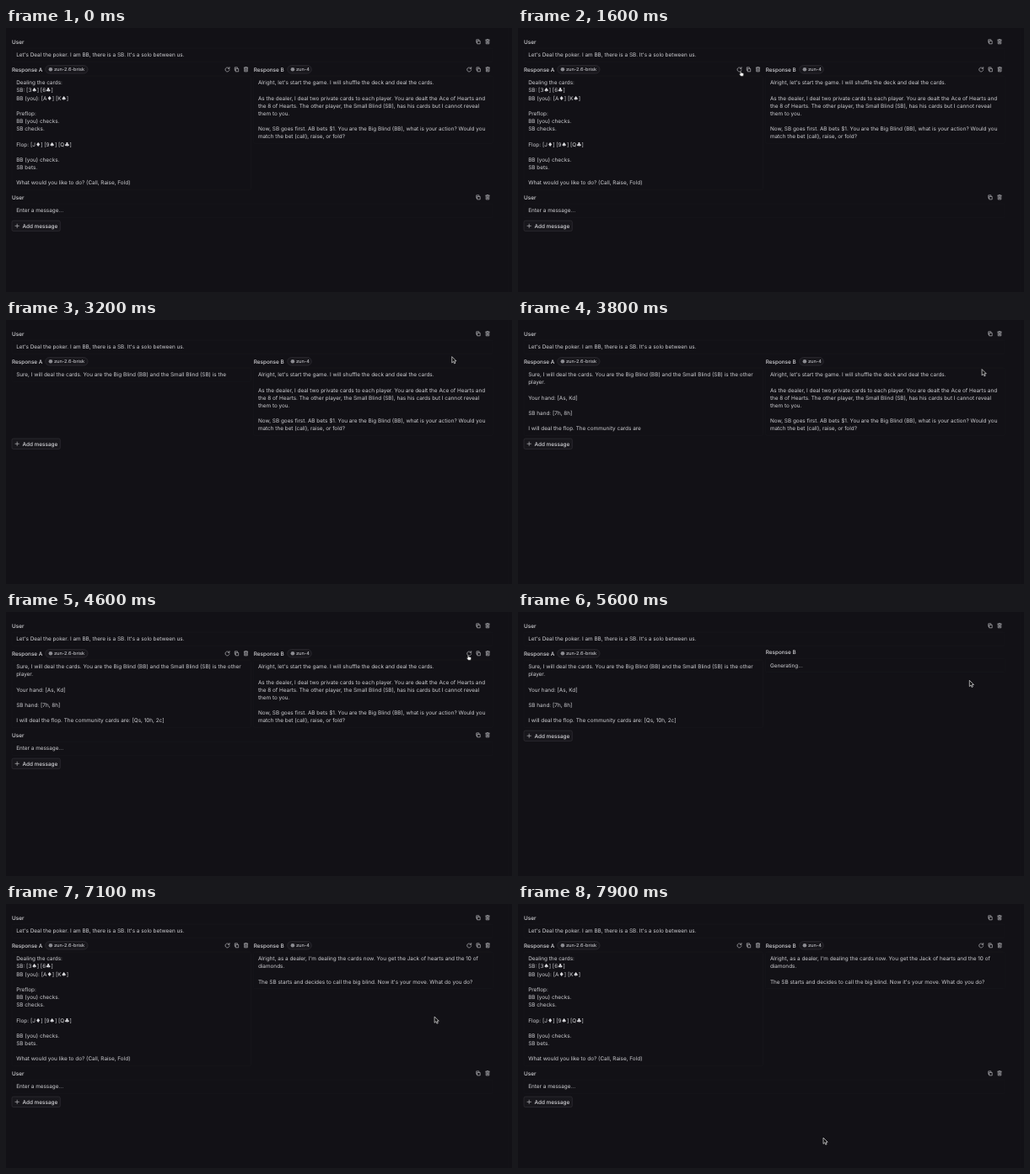
An HTML page for the animation above (8 s loop, 600 by 314 pixels).

```html
<!DOCTYPE html>
<html lang="en">
<head>
<meta charset="utf-8">
<title>Chat comparison</title>
<style>
html, body { margin: 0; width: 100%; height: 100%; overflow: hidden; background: #121116; }
svg { display: block; width: 100%; height: 100%; }
text { font: 6.4px Inter, "DejaVu Sans", sans-serif; fill: #cfcfd3; text-rendering: geometricPrecision; }
.suit { font-size: 7px; fill: #dcdce0; }
.head { font-weight: 500; fill: #d6d6da; }
.chip { font-size: 5.5px; font-weight: 500; fill: #c4c4c9; }
.box { fill: none; stroke: #19181d; stroke-width: .6; }
.pill { fill: #18171c; stroke: #36353b; stroke-width: .6; }
.icon { fill: none; stroke: #c0c0c5; stroke-width: .65; stroke-linecap: round; stroke-linejoin: round; }
.arrow { fill: #111; stroke: #e4e4e6; stroke-width: .7; stroke-linejoin: round; }
.hand { fill: #fff; stroke: #111; stroke-width: .45; stroke-linejoin: round; }
</style>
</head>
<body>
<svg id="stage" viewBox="0 0 600 314"></svg>
<script>
const LOOP = 8000, STEP = 100, LINE = 9.17;
const stage = document.getElementById('stage');

const PROMPT = "Let's Deal the poker. I am BB, there is a SB. It's a solo between us.";
const A_OLD = `Dealing the cards:
SB: [3♠] [6♣]
BB (you): [A♦] [K♠]

Preflop:
BB (you) checks.
SB checks.

Flop: [J♦] [9♠] [Q♣]

BB (you) checks.
SB bets.

What would you like to do? (Call, Raise, Fold)`;
const A_NEW = `Sure, I will deal the cards. You are the Big Blind (BB) and the Small Blind (SB) is the other
player.

Your hand: [As, Kd]

SB hand: [7h, 8h]

I will deal the flop. The community cards are: [Qs, 10h, 2c]`;
const B_OLD = `Alright, let's start the game. I will shuffle the deck and deal the cards.

As the dealer, I deal two private cards to each player. You are dealt the Ace of Hearts and
the 8 of Hearts. The other player, the Small Blind (SB), has his cards but I cannot reveal
them to you.

Now, SB goes first. AB bets $1. You are the Big Blind (BB), what is your action? Would you
match the bet (call), raise, or fold?`;
const B_NEW = `Alright, as a dealer, I'm dealing the cards now. You get the Jack of hearts and the 10 of
diamonds.

The SB starts and decides to call the big blind. Now it's your move. What do you do?`;

// Regeneration of each answer: click, first token, reply committed; rate in characters per ms
const A_RUN = { text: A_NEW, click: 2000, start: 2625, end: 4100, rate: .16 };
const B_RUN = { text: B_NEW, click: 4900, start: 5783, end: 7000, rate: .18 };

// Pointer glides between resting places; bend is a downward bow
const SHOW = 200, HOME = { x: 285, y: 221 };
const MOVES = [
  { from: 200, to: 1000, x: 264, y: 51 },
  { from: 1400, to: 1500, x: 386, y: 74 },
  { from: 1500, to: 1600, x: 264, y: 51 },
  { from: 2100, to: 3450, x: 555, y: 33, bend: 32 },
  { from: 3450, to: 4000, x: 548, y: 51, bend: 16 },
  { from: 5100, to: 5650, x: 535, y: 82 },
  { from: 6300, to: 7300, x: 505, y: 140 },
  { from: 7400, to: 7900, x: 362, y: 278 }
];

function pointerAt(t) {
  let { x, y } = HOME;
  for (const m of MOVES) {
    if (t <= m.from) break;
    const p = Math.min(1, (t - m.from) / (m.to - m.from)), e = p * p * (3 - 2 * p);
    x += (m.x - x) * e;
    y += (m.y - y) * e + (m.bend || 0) * Math.sin(Math.PI * e);
  }
  return { x, y };
}

// Reveals whole words only, as streamed tokens do; null while waiting.
function streamed({ text, start, rate }, t) {
  if (t < start) return null;
  const n = Math.floor((t - start) * rate), s = text.slice(0, n);
  return (/\w/.test(text[n] || '') ? s.replace(/\w+$/, '') : s).trimEnd();
}

const busy = (run, t) => t >= run.click && t < run.end;
const suits = s => s.replace(/[♠♣♦]/g, '<tspan class="suit">$&</tspan>');
const label = (x, y, s, cls = '') => `<text class="${cls}" x="${x}" y="${y + 2.3}">${suits(s)}</text>`;
const rect = (x, y, w, h, r, cls) =>
  `<rect class="${cls}" x="${x}" y="${y}" width="${w}" height="${h}" rx="${r}"/>`;
const shape = (cls, x, y, d) => `<path class="${cls}" transform="translate(${x} ${y})" d="${d}"/>`;
const icon = (x, y, d) => shape('icon', x, y, d);
const boxHeight = s => 7 + LINE * s.split('\n').length;

const RELOAD = 'M2 -1.4A2.5 2.5 0 1 0 2.5 .5M2.5 -2.7V-1H.8';
const COPY = 'M-.9 -.9H2.2V2.5H-.9ZM-1.3 1H-2.2V-2.5H.9V-1.5';
const TRASH = 'M-2.2 -2.2H2.2M-.8 -2.7H.8M-1.8 -1.9V2.5H1.8V-1.9M-.6 -.8V1.4M.6 -.8V1.4';
const PLUS = 'M-2.2 0H2.2M0 -2.2V2.2';
const ARROW = 'M0 0V7.3L1.7 5.7L2.8 8.2L4.1 7.7L3 5.2H5.2Z';
const HAND = 'M-.6 .3Q0 -.5 .6 .3V2.2L3 2.7Q3.8 3 3.6 4L3.1 6.2H.1L-1.7 4Q-1.6 3.1 -.6 3.8Z';

function message(x, y, w, s) {
  return rect(x, y, w, boxHeight(s), 1.5, 'box') +
    s.split('\n').map((l, i) => l && label(x + 5.2, y + 7.9 + i * LINE, l)).join('');
}

const tools = (x, y) => icon(x, y, COPY) + icon(x + 11, y, TRASH);

function userBlock(y, s) {
  return label(7, y, 'User', 'head') + tools(560, y) + message(7, y + 7.8, 570, s);
}

function response(x, name, model, chipX, chipW, s, done) {
  if (s === null) return label(x, 48, name, 'head') + message(x, 55.4, 283.5, 'Generating...');
  return label(x, 49.2, name, 'head') +
    rect(chipX, 44.6, chipW, 9.4, 4.7, 'pill') +
    `<circle cx="${chipX + 6.2}" cy="49.3" r="2.3" fill="#8b8b91"/>` +
    label(chipX + 10.3, 49, model, 'chip') + message(x, 57, 283.5, s) +
    (done ? icon(x + 255.5, 49.3, RELOAD) + tools(x + 266.5, 49.3) : '');
}

function pointer(t, done) {
  if (t < SHOW) return '';
  const { x, y } = pointerAt(t);
  const hover = done && y > 45 && y < 54 && [263, 549].some(c => Math.abs(x - c) < 4);
  return hover ? shape('hand', x, y, HAND) : shape('arrow', x, y, ARROW);
}

function draw(t) {
  const done = !busy(A_RUN, t) && !busy(B_RUN, t);
  const a = t < A_RUN.click || t >= B_RUN.end ? A_OLD : streamed(A_RUN, t);
  const b = t < B_RUN.click ? B_OLD : streamed(B_RUN, t);
  const bottom = 57 + Math.max(boxHeight(a || ''), boxHeight(b || ''));
  const addY = bottom + (done ? 43 : 9.9);
  stage.innerHTML = '<path class="box" d="M596 0V314"/>' +
    userBlock(16.3, PROMPT) +
    response(7, 'Response A', 'zun-2.6-brisk', 46.7, 50.3, a, done) +
    response(293.7, 'Response B', 'zun-4', 333.7, 28.6, b, done) +
    (done ? userBlock(bottom + 9, 'Enter a message...') : '') +
    rect(7, addY - 6.2, 57.3, 12.4, 1.8, 'pill') +
    icon(13.2, addY, PLUS) + label(19.5, addY, 'Add message', 'head') +
    pointer(t, done);
}

let start = null, last = -1;
function tick(now) {
  if (start === null) start = now;
  const t = Math.floor((now - start) % LOOP / STEP) * STEP;
  if (t !== last) draw(last = t);
  requestAnimationFrame(tick);
}
draw(0);
requestAnimationFrame(tick);
</script>
</body>
</html>
```
